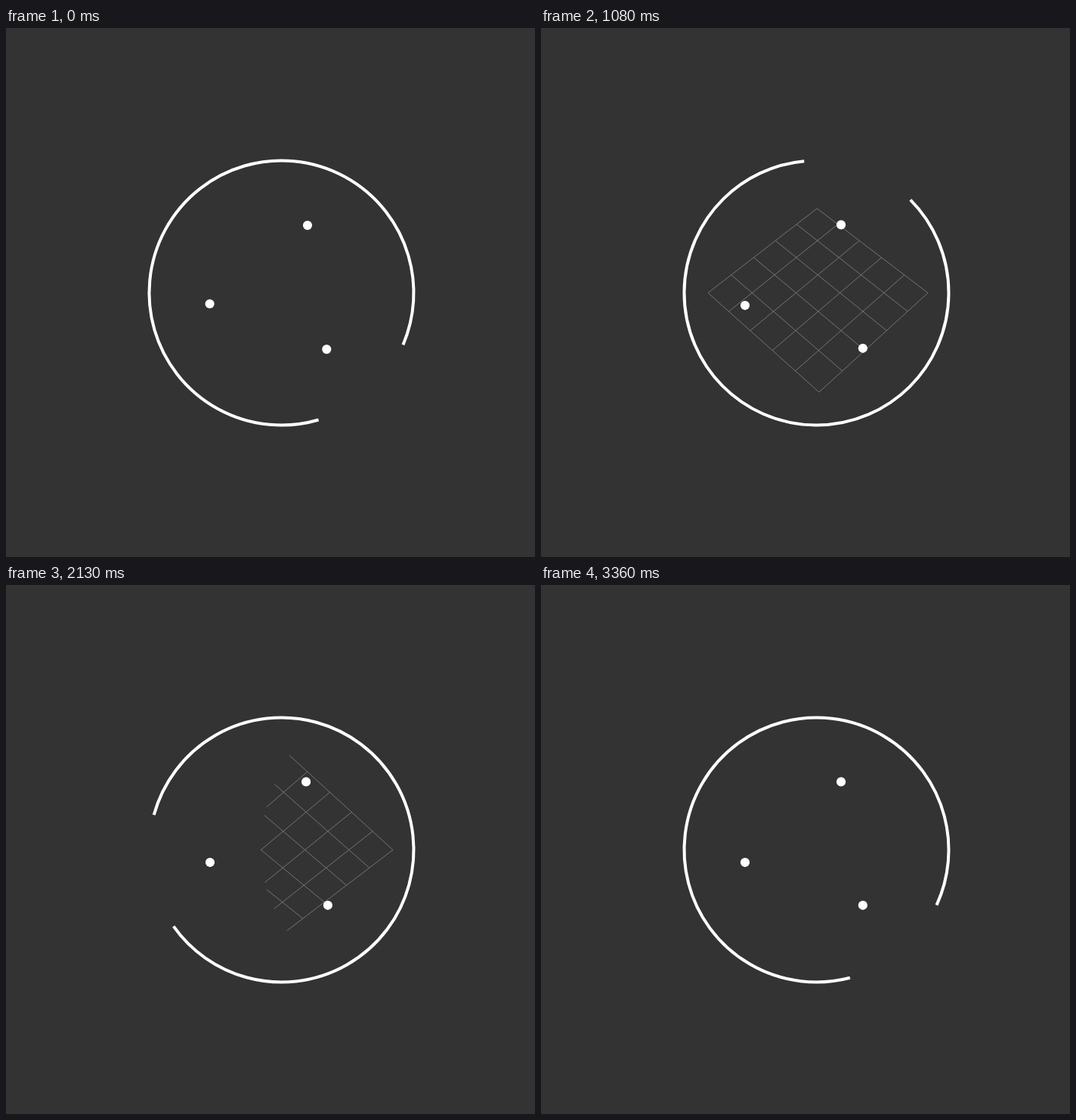
These frames come from a looping animation (700 px wide and 700 px high, 3420 ms). An HTML page with a canvas:

```html
<!DOCTYPE html>
<html lang="en">
<head>
<meta charset="utf-8">
<title>Loader</title>
<style>
html, body { margin: 0; width: 100%; height: 100%; overflow: hidden; background: #333; }
canvas { display: block; }
</style>
</head>
<body>
<canvas id="stage" width="700" height="700"></canvas>
<script>
const ctx = document.getElementById('stage').getContext('2d');
const LOOP = 3420, STEP = 30, TURN_EVERY = 1192;
const CX = 364.5, CY = 350.5, RAD = Math.PI / 180;
const HALF = 145.5, CELLS = 5, DEPTH = 1000;

// Ease with control points (a, 0) and (b, 1)
function ease(x, a, b) {
  if (x <= 0) return 0;
  if (x >= 1) return 1;
  let lo = 0, hi = 1, s;
  for (let i = 0; i < 30; i++) {
    s = (lo + hi) / 2;
    const at = 3 * (1 - s) ** 2 * s * a + 3 * (1 - s) * s * s * b + s ** 3;
    if (at < x) lo = s; else hi = s;
  }
  return s * s * (3 - 2 * s);
}

// Angle covered so far by three turns of 120 degrees
function turned(t, start, duration, a, b) {
  let sum = 0;
  for (let i = 0; i < 3; i++) sum += ease((t - start - i * TURN_EVERY) / duration, a, b);
  return 120 * sum;
}

function drawRing(t) {
  const gap = 50 - turned(t, -130, 700, 1.03, 0.27);
  ctx.beginPath();
  ctx.arc(CX, CY, 175, (gap + 25.3) * RAD, (gap + 334.7) * RAD);
  ctx.lineWidth = 4;
  ctx.strokeStyle = '#fff';
  ctx.stroke();
}

function drawDots(t) {
  const first = -70 + turned(t, -37, 800, 0.244, 0.732);
  ctx.fillStyle = '#fff';
  for (let i = 0; i < 3; i++) {
    const angle = (first + i * 120) * RAD;
    ctx.beginPath();
    ctx.arc(CX - 0.2 + 95.8 * Math.cos(angle), CY - 0.1 + 95.8 * Math.sin(angle), 6.1, 0, 2 * Math.PI);
    ctx.fill();
  }
}

function drawGrid(t) {
  const tilt = (1606 - t) * 0.0645 * RAD;
  const project = (x, y) => {
    const scale = DEPTH / (DEPTH - y * Math.sin(tilt));
    return [350 + (16.5 + x) * scale, CY + y * Math.cos(tilt) * scale];
  };

  // A disc in the grid plane reveals, then releases, the lines
  const entering = t < 1400;
  const discX = entering ? -125 : 253.5 + (t - 2130) * 0.326;
  const discR = entering ? 174.5 + (t - 810) * 0.38 : 283;
  if (discR <= 0 || discX - discR >= HALF) return;

  ctx.save();
  ctx.beginPath();
  for (let i = 0; i < 90; i++) {
    const angle = i * 4 * RAD;
    ctx.lineTo(...project(discX + discR * Math.cos(angle), discR * Math.sin(angle)));
  }
  ctx.clip();

  ctx.beginPath();
  for (let i = 0; i <= CELLS; i++) {
    const d = HALF * i / CELLS;
    for (const side of [-1, 1]) {
      ctx.moveTo(...project(d - HALF, side * d));
      ctx.lineTo(...project(d, side * (d - HALF)));
    }
  }
  ctx.lineWidth = 0.8;
  ctx.strokeStyle = '#858585';
  ctx.stroke();
  ctx.restore();
}

function draw(now) {
  const t = Math.min(Math.floor(now % LOOP / STEP) * STEP, LOOP - 2 * STEP);
  ctx.fillStyle = '#333';
  ctx.fillRect(0, 0, 700, 700);
  drawGrid(t);
  drawRing(t);
  drawDots(t);
}

const began = performance.now();
function tick() {
  draw(performance.now() - began);
  requestAnimationFrame(tick);
}
tick();
</script>
</body>
</html>
```
